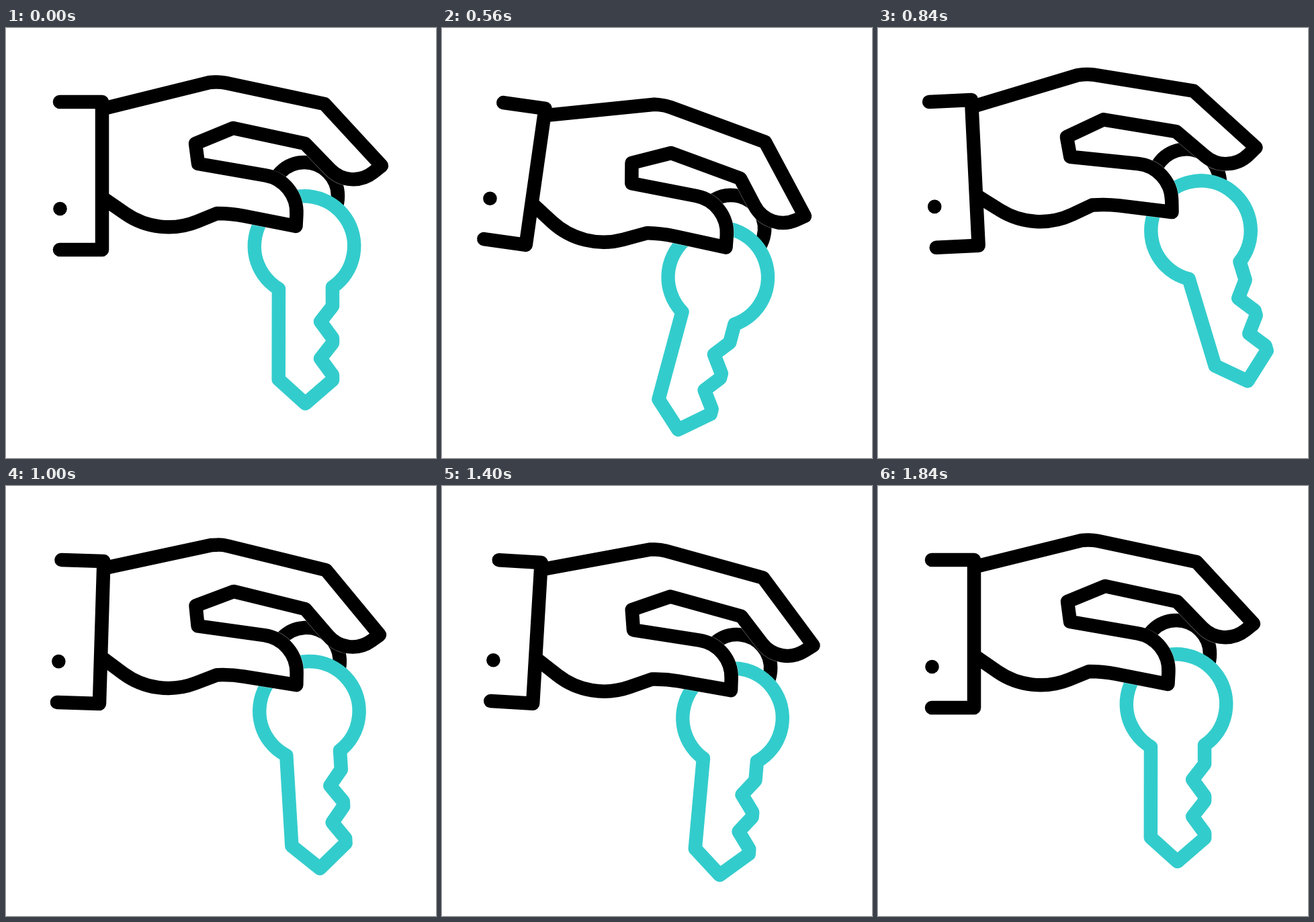
An HTML page with a canvas that plays this animation: 640x640 px, repeating every 2 s.

```html
<!DOCTYPE html>
<html lang="en">
<head>
<meta charset="utf-8">
<title>Hand holding a key</title>
<style>
  html, body { margin: 0; width: 100%; height: 100%; overflow: hidden; background: #fff; }
  canvas { display: block; width: 100vmin; height: 100vmin; }
</style>
</head>
<body>
<canvas id="stage" width="640" height="640"></canvas>
<script>
const ctx = document.getElementById('stage').getContext('2d');
const LOOP = 2000, STEP = 40;
const BLACK = '#000', TEAL = '#33cccc', WEIGHT = 20.5;

// Joints and how far each one turns, in degrees, at full bend
const WRIST = { x: 78, y: 190, turn: 8.1 };
const KNUCKLE = { x: 474, y: 113, turn: 6.5 };
const THUMB = { x: 284, y: 230, turn: -7 };

// Corners of the resting hand: x, y, corner radius
const BACK = [[147, 119.5], [303, 81], [319, 80, 60], [474, 113]];
const FINGER = [[559, 205], [513, 242, 48]];
const GRIP = [[445, 172], [338, 149], [282, 172], [286, 202]];
const THUMB_TIP = [[435, 228, 56], [431.5, 295], [335, 276, 200], [314, 276]];
const HEEL = [[228, 311, 113], [147, 255]];

// Turning points: time, value, optional ease-out power on the way there
const BEND = [[90, 0], [560, 1, 1.8], [570, 1], [870, -0.38], [1155, 1], [1600, 0]];
const SWING = [[90, 0], [560, 15, 3.2], [850, -17], [870, -17], [1190, 21], [1590, -8.5], [1850, 0]];

const wave = x => (1 - Math.cos(Math.PI * Math.min(1, Math.max(0, x)))) / 2;
const ramp = (t, from, to) => wave((t - from) / (to - from));

function sample(track, t) {
  const i = track.findIndex(k => t < k[0]);
  if (i < 0) return track[track.length - 1][1];
  if (i === 0) return track[0][1];
  const [t0, a] = track[i - 1], [t1, b, power] = track[i];
  const x = (t - t0) / (t1 - t0);
  return a + (b - a) * (power ? 1 - Math.pow(1 - x, power) : wave(x));
}

function turn([x, y, r = 0], joint, amount) {
  const a = joint.turn * amount * Math.PI / 180;
  const dx = x - joint.x, dy = y - joint.y, c = Math.cos(a), s = Math.sin(a);
  return [joint.x + dx * c - dy * s, joint.y + dx * s + dy * c, r];
}

function outline(points) {
  const path = new Path2D();
  points.forEach(([x, y, r], i) => {
    const next = points[i + 1];
    if (i === 0) path.moveTo(x, y);
    else if (r && next) path.arcTo(x, y, next[0], next[1], r);
    else path.lineTo(x, y);
  });
  return path;
}

function circle(x, y, r) {
  const path = new Path2D();
  path.arc(x, y, r, 0, 2 * Math.PI);
  return path;
}

function keyShape() {
  const path = new Path2D();
  path.arc(444, 324.5, 74.2, 0.97, 2.11, true);
  path.lineTo(405.7, 523);
  path.lineTo(445.5, 559);
  path.lineTo(486, 524);
  for (const y of [492, 437]) {
    path.lineTo(486, y + 24.5);
    path.lineTo(468, y);
    path.lineTo(486, y - 23);
  }
  path.closePath();
  return path;
}

const KEY = keyShape();
const RING = circle(444, 250, 50);

function stroke(path, color, width = WEIGHT) {
  ctx.strokeStyle = color;
  ctx.lineWidth = width;
  ctx.stroke(path);
}

function drawKey(bend, angle) {
  ctx.save();
  ctx.translate(444 - bend, 200 + 50.7 * bend);
  ctx.rotate(angle * Math.PI / 180);
  ctx.translate(-444, -200);
  stroke(RING, BLACK);
  ctx.fill(KEY);
  stroke(KEY, TEAL);
  ctx.restore();
}

function drawHand(bend, slack) {
  const hand = outline([
    ...BACK,
    ...FINGER.map(p => turn(p, KNUCKLE, bend)),
    ...GRIP,
    ...THUMB_TIP.map(p => turn(p, THUMB, slack)),
    ...HEEL
  ].map(p => turn(p, WRIST, bend)));
  ctx.fill(hand);
  stroke(hand, 'rgba(255,255,255,0.5)', WEIGHT + 1);
  stroke(hand, BLACK);
}

function drawCuff(bend, slack) {
  const rise = 15 * slack;
  const place = (x, y) => turn([x, y], WRIST, bend);
  stroke(outline([
    place(80, 110), place(143, 110), place(143, 330 - rise), place(80, 330 - rise)
  ]), BLACK);
  const [x, y] = place(80.5, 269 - rise);
  ctx.fillStyle = BLACK;
  ctx.fill(circle(x, y, 10.3));
}

function render(t) {
  const bend = sample(BEND, t);
  const slack = (0.4 + 0.6 * bend) * ramp(t, 90, 240) * ramp(t, 1600, 1400);
  ctx.fillStyle = '#fff';
  ctx.fillRect(0, 0, 640, 640);
  ctx.lineCap = ctx.lineJoin = 'round';
  drawKey(bend, sample(SWING, t));
  drawHand(bend, slack);
  drawCuff(bend, slack);
}

const start = performance.now();
function tick() {
  const t = (performance.now() - start) % LOOP;
  render(Math.floor(t / STEP) * STEP);
  requestAnimationFrame(tick);
}
tick();
</script>
</body>
</html>
```
